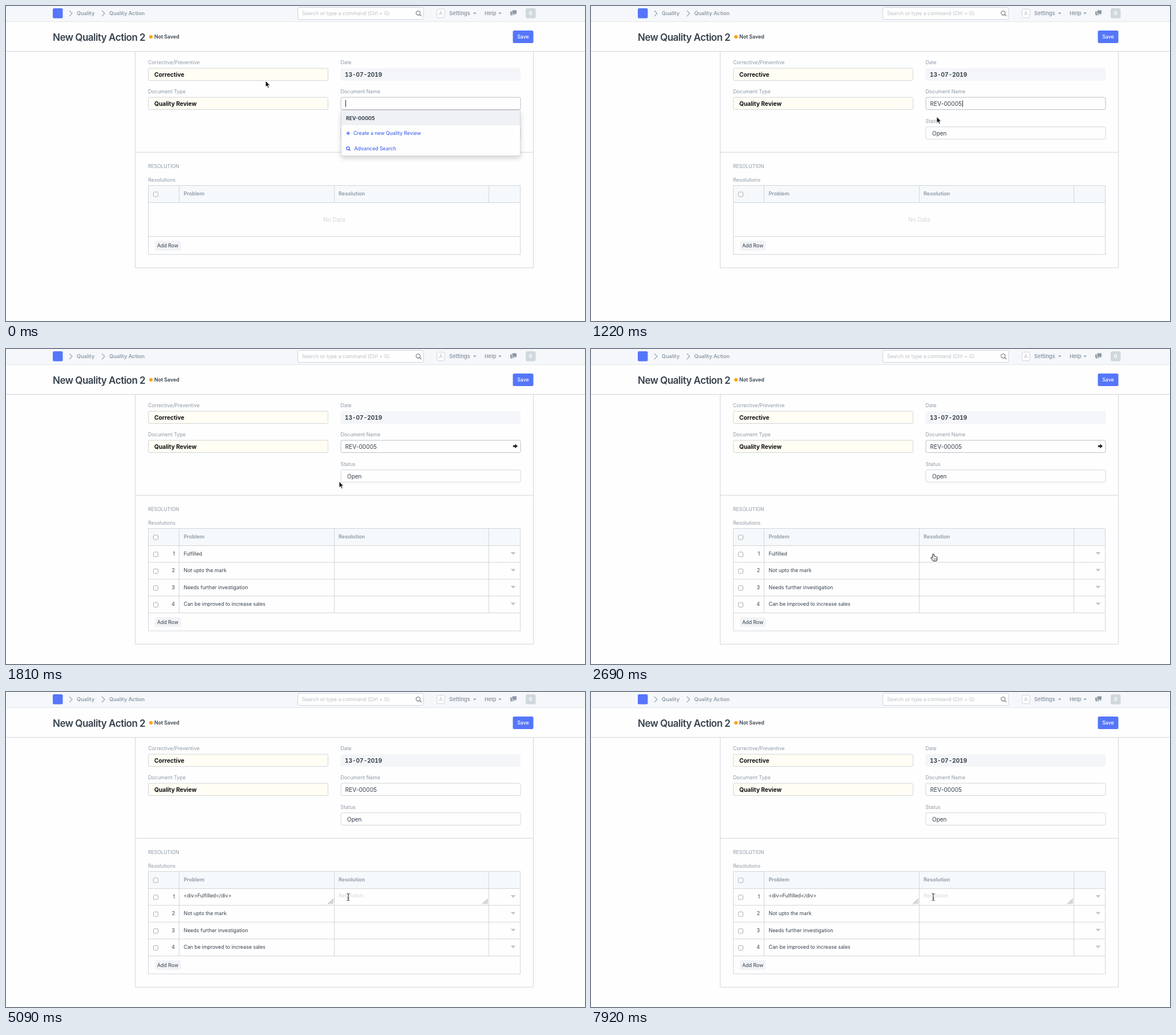
Recreate the animation shown at these times as an HTML page. Size 1015 by 552 pixels, loop 8 s.

```html
<!DOCTYPE html>
<html lang="en">
<head>
<meta charset="utf-8">
<title>New Quality Action</title>
<style>
html, body { margin: 0; width: 100%; height: 100%; overflow: hidden; background: #fefefe; }
svg { display: block; width: 1015px; height: 552px; font-family: Inter, Roboto, sans-serif; white-space: pre; }
</style>
</head>
<body>
<svg id="stage" viewBox="0 0 1015 552"></svg>
<script>
const LOOP = 8000;
const DARK = '#36414c', MUTED = '#8d99a6', LINE = '#d1d6da', BLUE = '#5576fa', LINK = '#4a69ee', FAINT = '#d2d6da';
const stage = document.getElementById('stage');

const esc = s => s.replace(/&/g, '&amp;').replace(/</g, '&lt;');
// y is the middle of the capitals
const text = (x, y, s, size = 8.8, fill = MUTED, weight = 400, extra = '') =>
  `<text x="${x}" y="${y + size * .364}" font-size="${size}" font-weight="${weight}" fill="${fill}" ${extra}>${esc(s)}</text>`;
const rect = (x, y, w, h, fill, stroke = 'none', r = 0, extra = '') =>
  `<rect x="${x}" y="${y}" width="${w}" height="${h}" rx="${r}" fill="${fill}" stroke="${stroke}" ${extra}/>`;
const path = (d, fill, stroke = 'none', width = 1, extra = '') =>
  `<path d="${d}" fill="${fill}" stroke="${stroke}" stroke-width="${width}" ${extra}/>`;
const line = (d, stroke = LINE, width = 1) => path(d, 'none', stroke, width);
const at = (x, y, s) => `<g transform="translate(${x} ${y})">${s}</g>`;
const field = (x, y, fill = '#fefefe', stroke = LINE) => rect(x, y, 315, 21.5, fill, stroke, 2.5);
const checkbox = y => rect(258.5, y - 4, 8, 8, '#fff', '#a9adb1', 1.8);
const lens = (x, y, r, color, width) =>
  `<circle cx="${x}" cy="${y}" r="${r}" fill="none" stroke="${color}" stroke-width="${width}"/>` +
  line(`M${x + r * .7} ${y + r * .7}l${r * .85} ${r * .85}`, color, width * 1.2);
const caret = (x, y, h, color = '#222') => rect(x, y, 1, h, color);
const grip = x => line(`M${x} 371.5l9.5-9M${x + 3.3} 371.5l6.2-6M${x + 6.6} 371.5l2.9-3`, '#777', .9);

const cursors = {
  arrow: path('M0 0V11L2.5 8.8 4.4 13 6.2 12.2 4.4 8.1H7.7Z', '#111', '#fff', .9),
  hand: path('M-1.3 1Q0-.8 1.2 1L1.4 4.2Q2.7 3.6 3.5 4.6 4.8 4.2 5.4 5.3 7 5.1 7 6.9L6.5 10 5.6 12.5H-.3Q-1.5 10-4 7.4-4.1 5.6-2.6 6.2L-1.3 7.4Z', '#fff', '#111', 1, 'stroke-linejoin="round"') +
    line('M1.2 7.8v2.8M3 7.8v2.8M4.8 7.8v2.8', '#111', .6),
  beam: line('M-2.5-5.8Q0-5.8 0-4.3V4.9Q0 6.4-2.5 6.4M2.5-5.8Q0-5.8 0-4.3M0 4.9Q0 6.4 2.5 6.4M-1.3 2.2H1.3', '#222', 1)
};

// time, x, y, kind: the pointer is held between moves
const pointer = [
  [0, 455, 131, 'arrow'], [150, 482, 137, 'arrow'], [300, 540, 158, 'arrow'], [450, 585, 181, 'arrow'],
  [620, 603, 191, 'hand'], [770, 606, 194, 'hand'], [1220, 606, 194, 'arrow'],
  [1810, 584, 232, 'arrow'], [1960, 520, 304, 'arrow'], [2110, 441, 369, 'hand'], [2250, 403, 393, 'hand'],
  [2400, 462, 386, 'hand'], [2550, 560, 367, 'hand'], [2690, 600, 359, 'hand'], [3440, 600, 359, 'beam']
];
const blink = (t, ...times) => times.filter(v => v <= t).length % 2 === 1;

const header =
  rect(0, 0, 1015, 27, '#f5f7fa') + line('M0 27.5H1015', '#e3e7eb') +
  rect(82, 4, 17.5, 17.5, BLUE, 'none', 2.5) +
  line('M111 8l5 5-5 5M168 8l5 5-5 5', '#9aa5b0', 1.2) +
  text(124, 13, 'Quality', 9.1, MUTED, 600) + text(181, 13, 'Quality Action', 9.1, MUTED, 600) +
  rect(511.5, 2.5, 220.5, 21, '#fefefe', LINE, 2.5) +
  text(519, 13, 'Search or type a command (Ctrl + G)', 8.8, '#b9c0c7') +
  lens(722.5, 12.3, 3.6, '#6c7680', 1.1) +
  rect(755.5, 5.5, 13.5, 15, '#fdfdfe', LINE, 2) + text(762.2, 13, 'A', 8.8, '#b5bdc5', 400, 'text-anchor="middle"') +
  text(777, 13, 'Settings', 9.2, MUTED, 600) + text(839, 13, 'Help', 9.2, MUTED, 600) +
  path('M819 11.5h5.4l-2.7 3ZM863.3 11.5h5.4l-2.7 3Z', MUTED) +
  path('M887.5 7.5h7.5v6h-1v2l-2-2h-4.5Z', MUTED) +
  path('M884 9.5h2.7v4.8h4.6v1.2h-3.8l-2 2v-2H884Z', MUTED) +
  rect(911, 4, 17.5, 17.5, '#d1d8dd', 'none', 3) + text(919.7, 13, '0', 8.6, '#fff', 700, 'text-anchor="middle"') +
  text(82, 54.5, 'New Quality Action 2', 17, DARK, 600, 'letter-spacing="-.5"') +
  '<circle cx="254" cy="54" r="3" fill="#ffa00a"/>' + text(260, 54, 'Not Saved', 8.8, DARK, 600) +
  rect(888.5, 43, 36, 22, BLUE, 'none', 2.5) + text(906.5, 54, 'Save', 8.8, '#fff', 500, 'text-anchor="middle"') +
  line('M0 79.5H1015', LINE);

const form =
  text(249, 99, 'Corrective/Preventive') + field(249.5, 109, '#fffdf4') + text(260, 120, 'Corrective', 10.2, '#111', 700) +
  text(249, 150, 'Document Type') + field(249.5, 160, '#fffdf4') + text(260, 171.3, 'Quality Review', 10.2, '#111', 700) +
  text(586.5, 99, 'Date') + rect(586.5, 109, 315.5, 22, '#f4f5f8', 'none', 2.5) +
  text(594, 120, '13-07-2019', 10.1, DARK, 700, 'style="font-variant-numeric:tabular-nums"') +
  text(586.5, 150, 'Document Name') +
  text(586.5, 202, 'Status') + field(587, 211.8) + text(598, 223, 'Open', 10, DARK) +
  line('M226.5 256.3H924.5') + text(249, 280.5, 'RESOLUTION', 8.5, MUTED) + text(249, 304.5, 'Resolutions');

const problems = ['Fulfilled', 'Not upto the mark', 'Needs further investigation', 'Can be improved to increase sales'];

function table(t) {
  const filled = t >= 1360, ruled = t >= 1510, editing = t >= 3290;
  const pitch = ruled ? 29.5 : 29;
  const foot = filled ? 344.5 + pitch * 4 - (ruled ? 0 : .5) : 404;
  let s = line(`M226.5 80V${foot + 54.8}H924.5V80`) +
    rect(249.5, 314.5, 652, foot - 283, '#fefefe', LINE) +
    rect(250, 315, 651, 29, '#f5f9fc') +
    line(`M249.5 344.5H901.5M249.5 ${foot}H901.5`) +
    line(`M303.5 314.5V${filled ? foot : 344}M575.5 314.5V${filled ? foot : 344}M846.5 314.5V${filled ? foot : 344}`) +
    checkbox(330) + text(311.5, 329, 'Problem', 9.1, MUTED, 600) + text(583, 329, 'Resolution', 9.1, MUTED, 600) +
    rect(261, foot + 7.5, 45.5, 17, '#f1f3f6', 'none', 2.5) + text(265, foot + 16, 'Add Row', 8.8, DARK);
  if (!filled) return s + text(575.5, 374, 'No Data', 10.2, FAINT, 400, 'text-anchor="middle"');
  problems.forEach((name, i) => {
    const y = 358.3 + pitch * i, edit = editing && !i;
    if (ruled && i) s += line(`M249.5 ${344.3 + pitch * i}H901.5`);
    s += checkbox(y + 1.5) + text(296, y, String(i + 1), 8.8, DARK, 400, 'text-anchor="end"') +
      text(311.5, edit ? y - 1.2 : y, edit ? `<div>${name}</div>` : name, 8.8, DARK) +
      path(`M884.5 ${y - 2.2}h9l-4.5 4.5Z`, '#c0c5ca');
  });
  if (editing) {
    const typed = t >= 7040 && t < 7780;
    s += grip(564.5) + grip(835.5) + text(583, 357, typed ? 'R' : 'Resolution', 8.8, typed ? DARK : FAINT);
    if (blink(t, 3440, 3890, 4490, 5090, 5690, 6140, 6740, 7330, 7780, 7920)) s += caret(typed ? 589 : 583, 351, 11);
  }
  return s;
}

function documentName(t) {
  let s = field(587, 160, '#fefefe', t < 3290 ? '#b9bfc5' : LINE);
  if (t >= 1220) {
    s += text(594.5, 171.3, 'REV-00005', 10.2, DARK);
    if (blink(t, 1220, 1810, 2250, 2690, 3140, 3290)) s += caret(651, 165.5, 11.5);
    if (t >= 1810 && t < 3740) s += path('M888.8 168.8h3.6v-2.5l4.6 4-4.6 4v-2.5h-3.6Z', '#222');
    return s;
  }
  if (blink(t, 0, 620, 1070)) s += caret(595, 165, 12);
  return s +
    rect(587.5, 182.5, 314, 80, '#fefefe', '#d0d4d8', 2.5, 'style="filter:drop-shadow(0 4px 4px rgba(0,0,0,.16))"') +
    rect(588, 183, 313, 26, '#f0f1f5') +
    text(596, 196.5, 'REV-00005', 8.8, t >= 620 ? '#111' : DARK, 700) +
    line('M596.5 223h6.4M599.7 219.8v6.4', LINK, 1.5) + text(609, 223.3, 'Create a new Quality Review', 8.7, LINK, 500) +
    lens(599.5, 249.3, 2.7, LINK, 1.3) + text(610.5, 250, 'Advanced Search', 8.7, LINK, 500);
}

function scene(t) {
  const [, x, y, kind] = pointer.filter(p => p[0] <= t).pop();
  return header + table(t) + form + documentName(t) + at(x, y, cursors[kind]);
}

const start = performance.now();
let shown = '';
function draw() {
  const next = scene((performance.now() - start) % LOOP);
  if (next !== shown) stage.innerHTML = shown = next;
  requestAnimationFrame(draw);
}
draw();
</script>
</body>
</html>
```
